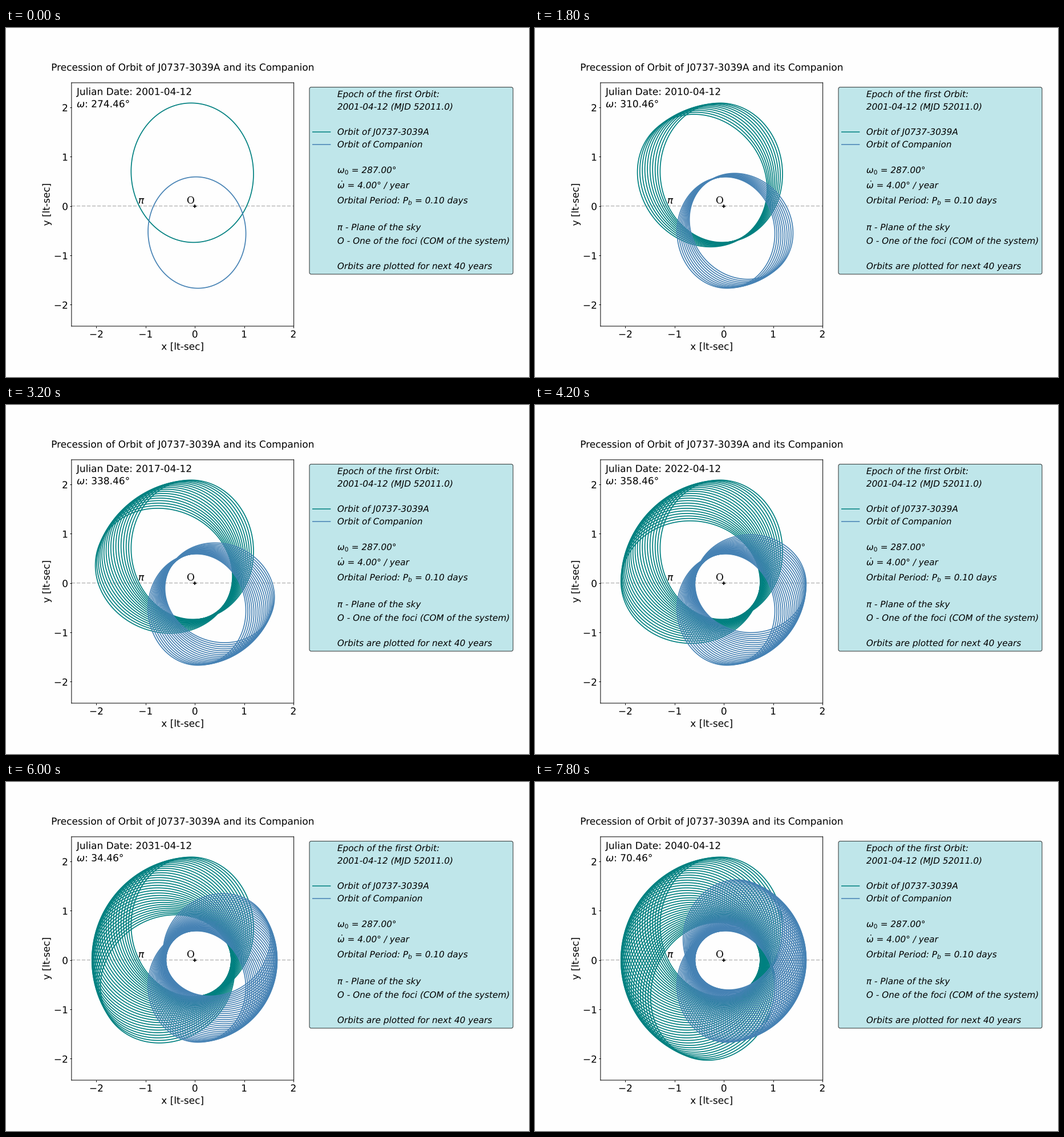
These frames come from a looping animation (917x611 px, 8000 ms). A matplotlib script:

```python
import numpy as np
import matplotlib.pyplot as plt
from matplotlib.animation import FuncAnimation
from matplotlib.collections import LineCollection
from matplotlib.patches import FancyBboxPatch
from matplotlib.patheffects import Normal
from matplotlib.text import Text

W, H, DPI = 917, 611, 64
K = 61.13 / DPI          # point sizes are designed for 61.13 dpi
PX = 72 / DPI            # one pixel in points
BIG, SMALL = 20 * K, 18 * K
PAPER = "#fefefe"

YEARS = 40
OMEGA_0, RATE = 274.46, 4.0
ECC = 0.4785
A_PULSAR, A_COMPANION = 1.4135, 1.1295

plt.rcParams.update({
    "font.family": "DejaVu Sans",
    "mathtext.fontset": "dejavusans",
    "font.size": BIG,
    "path.snap": False,
    "axes.linewidth": PX,
    "xtick.major.width": PX, "ytick.major.width": PX,
    "xtick.major.size": 3.5 * K, "ytick.major.size": 3.5 * K,
    "xtick.major.pad": 3.5 * K, "ytick.major.pad": 3.5 * K,
})


def orbit(a, periapsis):
    """Kepler ellipse with one focus at the centre of mass."""
    th = np.linspace(0, 2 * np.pi, 361)
    r = a * (1 - ECC**2) / (1 + ECC * np.cos(th - np.radians(periapsis)))
    return np.column_stack([r * np.cos(th), r * np.sin(th)])


def precess(a, shift):
    return [orbit(a, OMEGA_0 + shift + RATE * i) for i in range(YEARS)]


fig = plt.figure(figsize=(W / DPI, H / DPI), dpi=DPI, facecolor=PAPER)

# Main plot: pixel box, pixel position of the focus, pixels per light-second
left, right, top, bottom = 114.9, 504.6, 95.9, 522.0
x0, y0, scale = 331.2, 311.6, 86.37
ax = fig.add_axes([left / W, 1 - bottom / H, (right - left) / W, (bottom - top) / H],
                  facecolor=PAPER)
ax.set(xlim=((left - x0) / scale, (right - x0) / scale),
       ylim=((y0 - bottom) / scale, (y0 - top) / scale),
       xticks=range(-2, 3), yticks=range(-2, 3))
ax.set_xlabel("x [lt-sec]", labelpad=4 * K)
ax.set_ylabel("y [lt-sec]", labelpad=4 * K)
ax.set_title("Precession of Orbit of J0737-3039A and its Companion",
             fontsize=BIG, pad=25 * K)

ax.axhline(0, color="silver", ls="--", lw=2 * K, zorder=1)
ax.plot(0, 0, "+", color="black", ms=7 * K, mew=2 * K, zorder=4)
ax.text(-1.15, 0.05, r"$\pi$")
ax.text(-0.165, 0.05, "O", family="DejaVu Serif")
date_text = ax.text(-2.4, 2.25, "")
omega_text = ax.text(-2.4, 2.0, "")

tracks = []
for a, shift, color in ((A_PULSAR, 0, "teal"), (A_COMPANION, 180, "steelblue")):
    lines = LineCollection([], colors=color, linewidths=2 * K, zorder=2)
    ax.add_collection(lines, autolim=False)
    tracks.append((lines, precess(a, shift)))

# Info panel, laid out in pixels
panel = fig.add_axes([0, 0, 1, 1], facecolor="none")
panel.set(xlim=(0, W), ylim=(H, 0))
panel.axis("off")
panel.add_patch(FancyBboxPatch(
    (532, 103.6), 357, 327.4, boxstyle="round,pad=0,rounding_size=3.06",
    fc="powderblue", ec="black", lw=PX, alpha=0.8))

for y, color in ((182, "teal"), (204, "steelblue")):
    panel.plot([537.8, 568.6], [y, y], color=color, lw=1.8 * K)

ROWS = [
    (121, "Epoch of the first Orbit:"),
    (143, "2001-04-12 (MJD 52011.0)"),
    (187, "Orbit of J0737-3039A"),
    (209, "Orbit of Companion"),
    (254, r"$\omega_0$ = 287.00°"),
    (280.6, r"$\dot{\omega}$ = 4.00° / year"),
    (307, r"Orbital Period: $P_b$ = 0.10 days"),
    (354, r"$\pi$ - Plane of the sky"),
    (377.8, "O - One of the foci (COM of the system)"),
    (422, "Orbits are plotted for next 40 years"),
]
for y, label in ROWS:
    panel.text(580.9, y, label, fontsize=SMALL, style="italic")

# Draw text as outlines: unhinted and placed at fractions of a pixel
for text in fig.findobj(Text):
    text.set_path_effects([Normal()])


def update(i):
    for lines, orbits in tracks:
        lines.set_segments(orbits[:i + 1])
    date_text.set_text(f"Julian Date: {2001 + i}-04-12")
    omega_text.set_text(rf"$\omega$: {(OMEGA_0 + RATE * i) % 360:.2f}°")
    return [lines for lines, _ in tracks] + [date_text, omega_text]


anim = FuncAnimation(fig, update, frames=YEARS, interval=200,
                     repeat=True, repeat_delay=0, blit=False)
plt.show()
```
